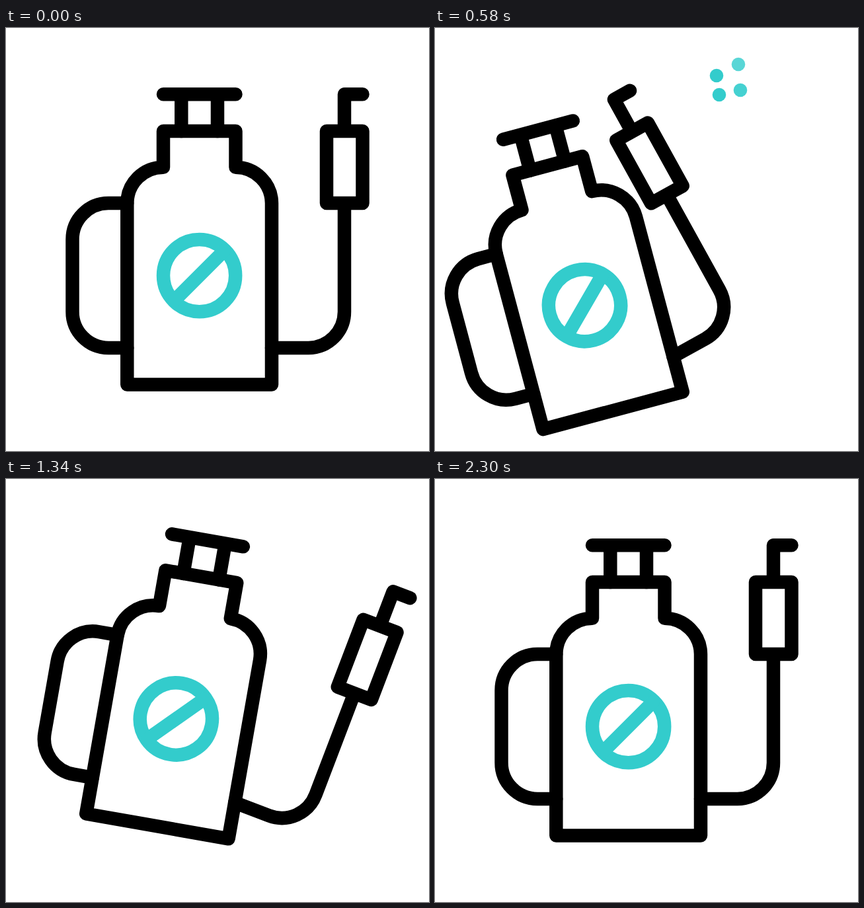
Animation, 640 px wide and 640 px high, one loop 2400 ms. Source, as an HTML page:

```html
<!DOCTYPE html>
<html>
<head>
<meta charset="utf-8">
<style>
html, body { margin: 0; width: 100%; height: 100%; overflow: hidden; background: #fff; }
svg { display: block; width: 100%; height: 100%; fill: none; stroke: #000; stroke-width: 20.5; stroke-linecap: round; stroke-linejoin: round; }
</style>
</head>
<body>
<svg viewBox="0 0 640 640">
  <g id="drops" fill="#3cc" stroke="none"></g>
  <g id="body">
    <path d="M183.3 265H155A54.7 54.7 0 0 0 100.5 320V429A54.7 54.7 0 0 0 155 484H183.3"/>
    <path d="M238 156H347.5V210.7A54.7 54.7 0 0 1 402 265V539.5H183.3V265A54.7 54.7 0 0 1 238 210.7Z"/>
    <path d="M238 100.3H347.5M265.3 100.3V156M320 100.3V156"/>
    <g stroke="#3cc">
      <circle cx="292.6" cy="374.6" r="54.6"/>
      <path d="M255 412L330 337"/>
    </g>
    <g id="hose">
      <path d="M402 484H457.5A54.7 54.7 0 0 0 512 429V265M485 156H539.5V265H485ZM512 156V100.3H539.5"/>
    </g>
  </g>
</svg>
<script>
const LOOP = 2400;
const NS = 'http://www.w3.org/2000/svg';
const get = id => document.getElementById(id);
const clamp = x => Math.min(1, Math.max(0, x));
const smooth = x => x * x * (3 - 2 * x);

const bodyTimes = [0, 600, 1210, 1667, 2210];
const bodyAngles = [0, -15, 13.8, -5.45, 0];
const hoseTimes = [100, 700, 1310, 1767, 2300];
const hoseAngles = [0, -15.6, 11.2, -11, 0];

// Path of the sprayer's anchor, one curve per pair of keys
const curves = [
  'M0 0C0 0-75.5 61-79 57.5',
  'M-79 57.5C-87 46-48-34-30-35',
  'M-30-35C-22-35.5-24 49-19.5 55.2',
  'M-19.5 55.2C-15 61 0 0 0 0'
].map(d => {
  const path = document.createElementNS(NS, 'path');
  path.setAttribute('d', d);
  return path;
});

// Each puff: when it starts and ends, and its four drops
const puffs = [
  { start: 470, end: 980, spots: [[430, 101], [426, 72], [462, 94], [459, 55]] },
  { start: 833, end: 1070, spots: [[546, 151], [550, 122], [579, 153], [586, 114]] }
];
const drops = puffs.flatMap(({ start, end, spots }) => spots.map(([x, y], i) => {
  const dot = document.createElementNS(NS, 'circle');
  dot.setAttribute('cx', x);
  dot.setAttribute('cy', y);
  dot.setAttribute('r', 10.3);
  get('drops').append(dot);
  return { dot, start: start + i * 10, end };
}));

function segment(times, t) {
  let i = 0;
  while (i < times.length - 2 && t >= times[i + 1]) i++;
  return [i, smooth(clamp((t - times[i]) / (times[i + 1] - times[i])))];
}

function angle(times, values, t) {
  const [i, p] = segment(times, t);
  return values[i] + (values[i + 1] - values[i]) * p;
}

function draw(now) {
  const t = now % LOOP;
  const [i, p] = segment(bodyTimes, t);
  const { x, y } = curves[i].getPointAtLength(p * curves[i].getTotalLength());
  get('body').setAttribute('transform',
    `translate(${x} ${y}) rotate(${angle(bodyTimes, bodyAngles, t)} 251 320)`);
  get('hose').setAttribute('transform',
    `rotate(${angle(hoseTimes, hoseAngles, t)} 402 484)`);
  for (const { dot, start, end } of drops)
    dot.setAttribute('opacity', clamp(Math.min((t - start) / 100, (end - t) / 80)));
  requestAnimationFrame(draw);
}
requestAnimationFrame(draw);
</script>
</body>
</html>
```
